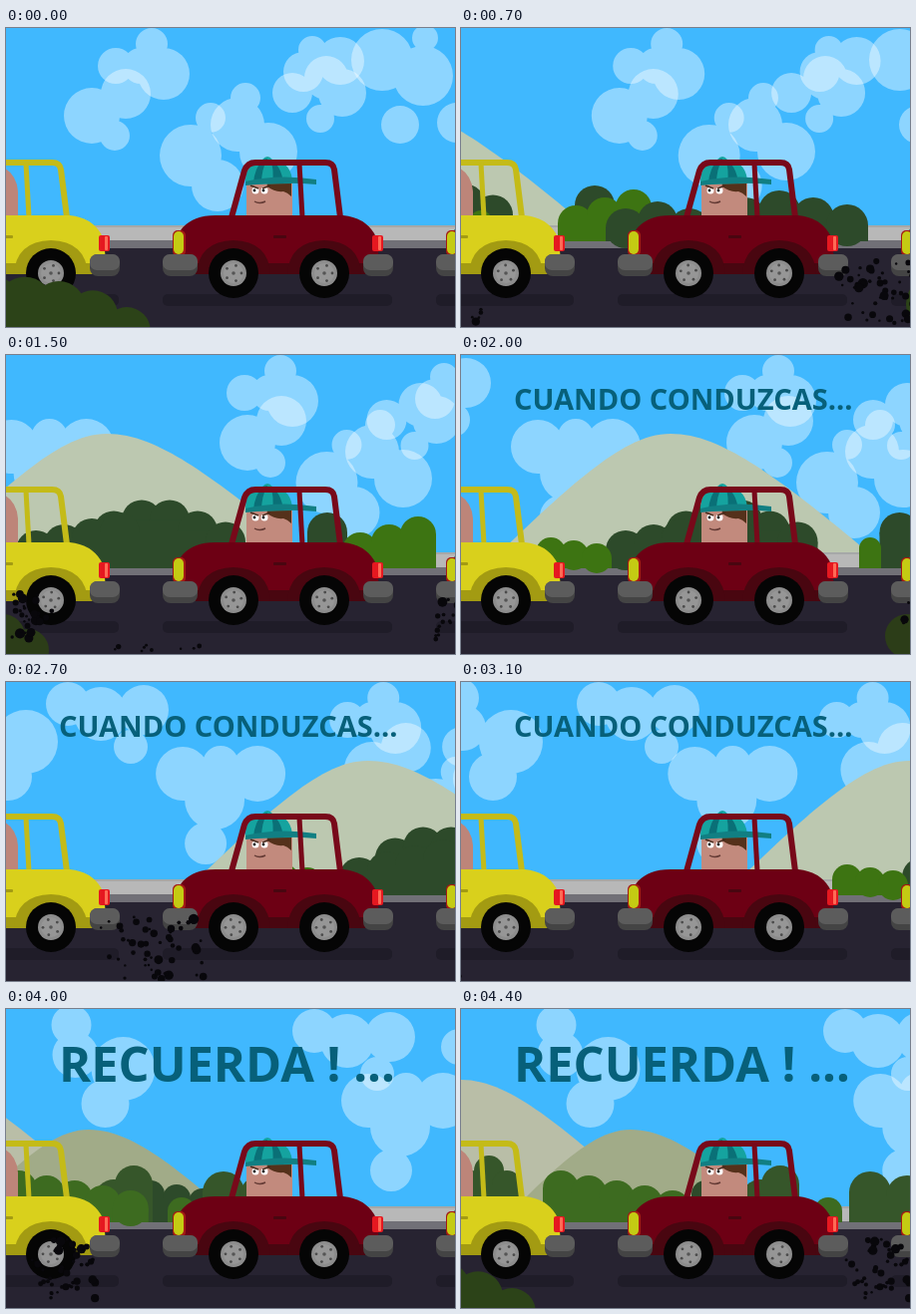
Recreate the animation shown at these times as an HTML page with a canvas. Size 450x300 px, loop 4.5 s.

```html
<!DOCTYPE html>
<html lang="es">
<head>
<meta charset="utf-8">
<title>Cuando conduzcas</title>
<style>
html, body { margin: 0; width: 100%; height: 100%; overflow: hidden; background: #40b8fe; }
canvas { display: block; width: 450px; height: 300px; }
</style>
</head>
<body>
<canvas id="stage" width="450" height="300"></canvas>
<script>
const g = document.getElementById('stage').getContext('2d');
const LOOP = 4500, STEP = 100;
const DARK = '#2d4a2a', LIGHT = '#3d7412', PINE = '#36562a', MOSS = '#3d6b20';

// time of reference, speed in px/s, circles [x, y, r]
const clouds = [
  [0, 86, [[146, 16, 16], [158, 46, 26], [110, 38, 18], [135, 38, 18]]],
  [0, 104, [[86, 88, 28], [109, 108, 15], [120, 66, 25]]],
  [0, 91, [[185, 128, 31], [205, 90, 15], [212, 158, 26]]],
  [0, 90, [[240, 70, 15], [232, 97, 27], [263, 124, 29]]],
  [0, 63, [[321, 50, 22], [337, 65, 24], [287, 65, 20], [315, 91, 14]]],
  [0, 88, [[307, 22, 14], [335, 33, 24], [298, 44, 20]]],
  [0, 90, [[377, 32, 31], [420, 10, 13], [418, 48, 30], [395, 97, 19], [452, 95, 20]]],
  [2000, 143, [[77, 92, 27], [115, 82, 18], [152, 92, 28], [109, 118, 30], [100, 162, 21]]],
  [2700, 190, [[62, 22, 22], [95, 32, 27], [125, 65, 17], [138, 28, 25]]],
  [3500, 75, [[28, 16, 20], [32, 46, 23], [62, 95, 24], [80, 60, 32]]]
];

// time, speed, peak x, peak y, width factor, colour
const hills = [
  [2000, 218, 210, 79, 1, '#bcc8b0'],
  [4400, 218, 0, 71, .92, '#b9bea7'],
  [4400, 218, 170, 121, .9, '#a1ab88']
];

// time, speed, colour, x, y, r, then for rows: count, step, index of the top, drop
const bushes = [
  [700, 620, DARK, 285, 184, 21, 4, 34, 1, 7],
  [1500, 235, DARK, 108, 160, 20, 5, 28, 1.5, 11],
  [1500, 235, DARK, 322, 178, 20],
  [700, 300, LIGHT, 20, 194, 11],
  [700, 300, LIGHT, 115, 180, 18, 3, 29, 2, 8],
  [700, 420, DARK, 165, 194, 20, 3, 32, 1, 7],
  [2000, 270, DARK, 165, 178, 20, 4, 28, 3, 6],
  [2000, 270, LIGHT, 90, 198, 15, 3, 23, 0, 3],
  [3500, 250, DARK, 20, 186, 14, 3, 26, 0, 4],
  [4400, 218, PINE, 10, 162, 15, 3, 18, 1, 15],
  [4400, 480, PINE, 300, 176, 19, 2, 20, 1, 14],
  [4400, 480, PINE, 410, 184, 21, 2, 37, 0, 4],
  [4400, 218, MOSS, 100, 180, 18, 5, 28, 0, 5],
  [4400, 480, MOSS, 368, 203, 14]
];

// time, speed, x, y, width, height, count
const gravel = [
  [700, 900, 374, 234, 95, 62, 48],
  [700, 900, -60, 282, 105, 16, 18],
  [1500, 900, -10, 238, 65, 48, 30],
  [1500, 900, 100, 290, 125, 8, 9],
  [1500, 900, 420, 244, 60, 48, 24],
  [2700, 900, 85, 235, 130, 63, 52],
  [3500, 900, 155, 252, 215, 44, 62],
  [4400, 900, 380, 230, 90, 62, 46]
];

let t = 0;
const shift = (at, v) => (t - at) / 1000 * v;

function rnd(seed) {
  return () => {
    seed = (seed * 16807) % 2147483647;
    return seed / 2147483647;
  };
}

function rect(x, y, w, h, color, r = 0) {
  g.fillStyle = color;
  g.beginPath();
  g.roundRect(x, y, w, h, r);
  g.fill();
}

function disc(x, y, r, color) {
  g.fillStyle = color;
  g.beginPath();
  g.arc(x, y, r, 0, 7);
  g.fill();
}

function shape(d, color) {
  g.fillStyle = color;
  g.fill(new Path2D(d));
}

function line(d, color, width) {
  g.strokeStyle = color;
  g.lineWidth = width;
  g.stroke(new Path2D(d));
}

// One fill for all circles, so overlaps inside a group stay even
function blob(dx, circles, color) {
  g.fillStyle = color;
  g.beginPath();
  for (const [x, y, r] of circles) {
    g.moveTo(x + dx + r, y);
    g.arc(x + dx, y, r, 0, Math.PI * 2);
  }
  g.fill();
}

function hill([at, v, x, top, wide, color]) {
  const px = x + shift(at, v);
  g.fillStyle = color;
  g.beginPath();
  for (let d = -220; d <= 220; d += 5) {
    const c = (d < 0 ? 75 : 87) * wide;
    g.lineTo(px + d, top + 80 * (Math.hypot(1, d / c) - 1));
  }
  g.fill();
}

function bush([at, v, color, x, y, r, n = 1, step = 0, peak = 0, drop = 0]) {
  const dx = x + shift(at, v);
  for (let i = 0; i < n; i++) {
    const cx = dx + i * step, cy = y + Math.abs(i - peak) * drop;
    disc(cx, cy, r, color);
    rect(cx - r, cy, 2 * r, 214 - cy, color);
  }
}

function shrub(at) {
  const dx = shift(at, 700), list = [];
  for (let i = 0; i < 5; i++) list.push([i * 34 - 15, 277 + i ** 3 * .42, 29 - i * 1.3]);
  blob(dx, list, '#2c4318');
}

function stones([at, v, x, y, w, h, n], i) {
  const rand = rnd(977 + i * 7919), dx = x + shift(at, v);
  for (let k = 0; k < n; k++) {
    const px = dx + (rand() + rand()) / 2 * w, py = y + rand() * h;
    disc(px, py, 1.2 + 4 * rand() ** 2, '#08070b');
  }
}

function wheel(x) {
  disc(x, 246, 25, '#050505');
  disc(x, 246, 13, '#8d8d8d');
  disc(x, 246, 10, '#969696');
  for (let i = 0; i < 5; i++) {
    const a = i * Math.PI * .4 - t / 130;
    disc(x + 8 * Math.cos(a), 246 + 8 * Math.sin(a), 1.4, '#4b4b4b');
  }
  disc(x, 246, 1.8, '#555');
}

function capDriver() {
  rect(241, 152, 46, 42, '#c28a7d', 4);
  shape('M261 153H286V169Q282 165 278 164Q269 165 262 159Z', '#55311b');
  for (const x of [250, 259]) {
    disc(x, 163, 3.5, '#fff');
    disc(x - 1, 163, 1.4, '#111');
  }
  line('M245 158L253 161M257 161L265 158', '#4a2a1c', 1.6);
  line('M249 174Q254 177 260 174', '#633a34', 1.4);
  shape('M240 157Q239 136 257 132Q262 126 267 132Q287 135 287 156Z', '#15a39f');
  shape('M248 156Q249 140 258 132L262 131Q256 142 256 156Z', '#0a7077');
  shape('M267 156Q269 142 265 132Q276 138 278 156Z', '#0a7077');
  shape('M240 154Q272 146 311 152V157Q280 154 240 158Z', '#117f83');
}

function plainDriver() {
  shape('M232 190V150Q246 132 260 137Q284 140 286 164V190Z', '#bd8579');
}

function car(dx, body, dark, trim, driver) {
  g.save();
  g.translate(dx, 0);
  driver();
  line('M226 190L239 143Q242 135 250 135H320Q328 135 329 142L335 190', trim, 6);
  line('M294 136L297 190', trim, 5);
  shape('M172 240V211Q174 198 191 191Q198 188 210 188H338Q359 190 369 206Q374 215 374 247H176Z', body);
  rect(176, 236, 198, 11, dark);
  for (const x of [228, 319]) shape(`M${x - 37} 247Q${x - 35} 214 ${x} 213Q${x + 35} 214 ${x + 37} 247Z`, dark);
  rect(268, 208, 13, 3, dark, 1);
  wheel(228);
  wheel(319);
  rect(167, 203, 13, 26, '#a31a15', 5);
  rect(168, 204, 10, 23, '#c4cb13', 5);
  rect(367, 208, 11, 16, '#e51820', 2);
  rect(373, 209, 3, 14, '#ff6b55', 1);
  for (const [x, w] of [[157, 35], [358, 30]]) {
    rect(x, 227, w, 22, '#444', 8);
    rect(x, 227, w, 16, '#5c5c5c', 7);
  }
  g.restore();
}

function caption(text, size, y) {
  g.font = `bold ${size}px "Open Sans", "Noto Sans", sans-serif`;
  g.fillStyle = '#07607a';
  g.fillText(text, 53, y);
}

function draw() {
  rect(0, 0, 450, 300, '#40b8fe');
  for (const [at, v, list] of clouds) blob(shift(at, v), list, 'rgba(255,255,255,.4)');
  hills.forEach(hill);
  rect(0, 198, 450, 15, '#b8b8b8');
  rect(0, 198, 450, 2, '#a6a8a8');
  rect(0, 213, 450, 9, '#717077');
  bushes.forEach(bush);
  rect(0, 221, 450, 79, '#272331');
  for (const dx of [-274, 0, 274]) rect(157 + dx, 267, 230, 12, '#1f1c28', 5);

  car(-274, '#d9d01c', '#a39b12', '#c4bb18', plainDriver);
  car(274, '#1b6670', '#124650', '#185a64', plainDriver);
  car(0, '#6d0014', '#490610', '#78091a', capDriver);

  shrub(0);
  shrub(LOOP);
  blob(shift(1500, 900), [[-3, 282, 22], [22, 296, 21]], '#2c3d18');
  gravel.forEach(stones);

  if (t >= 3800) caption('RECUERDA ! ...', 48.8, 73);
  else if (t >= 1700) caption('CUANDO CONDUZCAS...', 29, 55);
}

const start = performance.now();
function tick() {
  const ms = (performance.now() - start) % LOOP;
  t = Math.floor(ms / STEP) * STEP;
  draw();
  requestAnimationFrame(tick);
}
tick();
</script>
</body>
</html>
```
